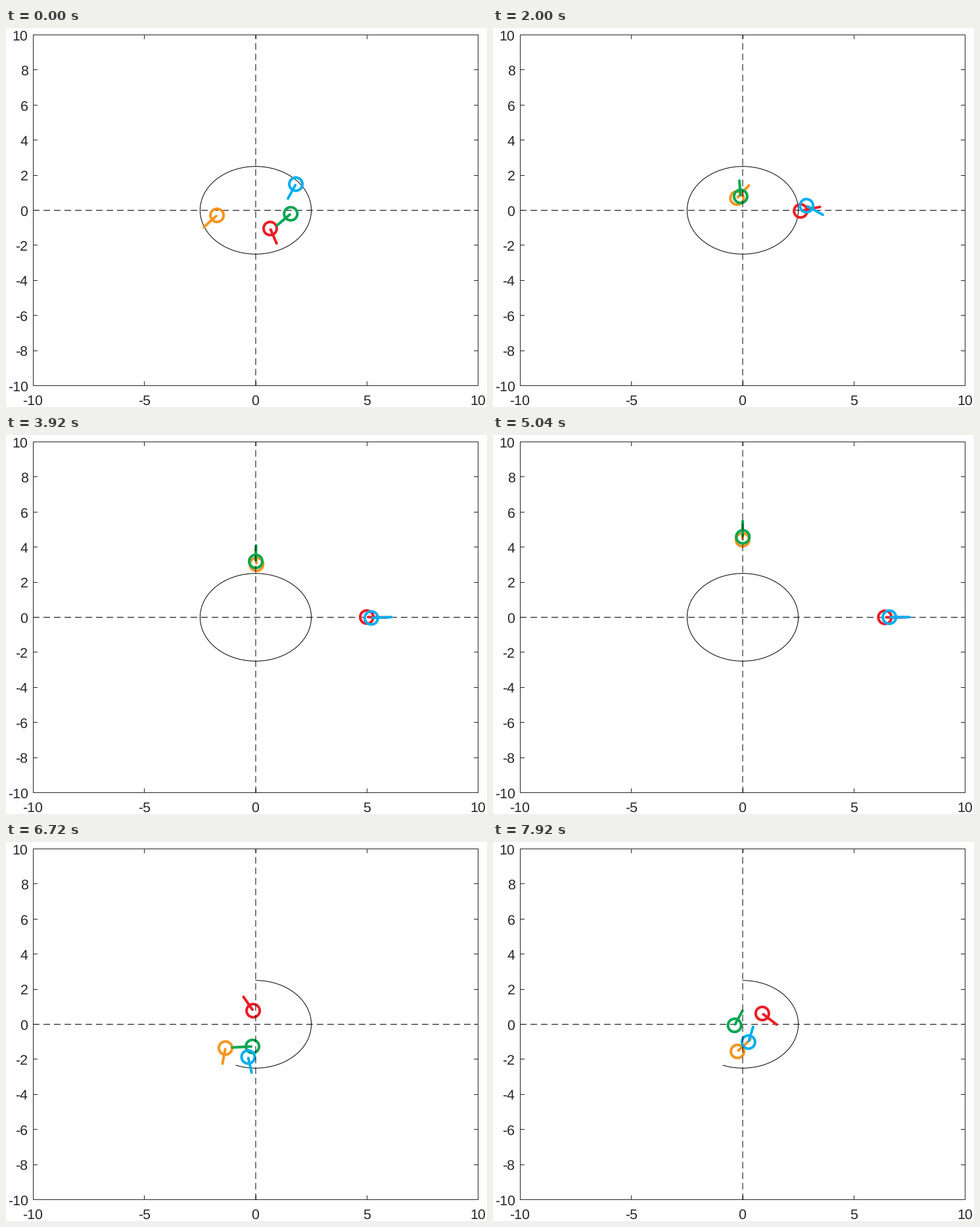
Animation of 732 by 577 pixels, one loop 8000 ms. Source, as a matplotlib script:

```python
import numpy as np
import matplotlib.pyplot as plt
from matplotlib.animation import FuncAnimation
from matplotlib.patches import Circle

WIDTH, HEIGHT, DPI = 732, 577, 96
PX = 72 / DPI  # points per pixel
LEFT, RIGHT, TOP, BOTTOM = 41.5, 718.5, 10.5, 544.5
FRAMES, INTERVAL = 100, 80
STEP, GAIN = 0.1, 2.0
STICK_START, STICK_END = 0.06, 0.9
RADIUS, STROKE = 10, 4
INK = "#262626"

plt.rcParams["font.family"] = "Liberation Sans"
plt.rcParams["text.hinting"] = "none"

# Robots in drawing order: colour and heading of the line each one follows
ROBOTS = [("#f7941e", np.pi / 2), ("#ed1c24", 0.0),
          ("#00a651", np.pi / 2), ("#00aeef", 0.0)]

# Each run: number of frames, last angle of the start zone, (x, y, heading) per robot
RUNS = [
    (81, -270.0, [(-1.74, -0.29, 3.99), (0.65, -1.04, -1.24),
                  (1.575, -0.2, 3.962), (1.805, 1.49, 4.306)]),
    (19, -110.7, [(-1.119, -1.3, -3.691), (0.055, 0.891, 4.815),
                  (-0.01, -1.034, 4.7875), (-0.157, -1.885, -4.454)]),
]


def to_px(x, y):
    return ((LEFT + RIGHT) / 2 + x * (RIGHT - LEFT) / 20,
            (TOP + BOTTOM) / 2 - y * (BOTTOM - TOP) / 20)


def crisp(value):
    """Centre of the pixel that holds a coordinate."""
    return np.floor(value) + 0.5


def follow_line(pose, goal):
    """One Euler step of a unicycle steering onto an axis through the origin."""
    x, y, heading = pose
    offset = y * np.cos(goal) - x * np.sin(goal)
    turn = GAIN * (goal - heading - offset)
    return (x + STEP * np.cos(heading), y + STEP * np.sin(heading),
            heading + STEP * turn)


def simulate():
    states = []
    for count, zone_end, poses in RUNS:
        for _ in range(count):
            states.append((zone_end, poses))
            poses = [follow_line(p, goal) for p, (_, goal) in zip(poses, ROBOTS)]
    return states


states = simulate()

fig = plt.figure(figsize=(WIDTH / DPI, HEIGHT / DPI), dpi=DPI, facecolor="white")
ax = fig.add_axes([0, 0, 1, 1])
ax.set_xlim(0, WIDTH)
ax.set_ylim(HEIGHT, 0)
ax.axis("off")


def line(xs, ys, color="black", width=1, **style):
    return ax.plot(xs, ys, color=color, lw=width * PX, snap=False, **style)[0]


def label(x, y, value, align):
    ax.text(x, y, str(value), size=16, color=INK, ha=align, va="baseline")


def draw_axes():
    frame = dict(color=INK, solid_capstyle="projecting", zorder=1)
    line([LEFT, RIGHT, RIGHT, LEFT, LEFT], [TOP, TOP, BOTTOM, BOTTOM, TOP], **frame)
    for value in range(-10, 11, 5):
        x = to_px(value, 0)[0]
        tick = crisp(x)
        line([tick, tick], [TOP, TOP + 6], **frame)
        line([tick, tick], [BOTTOM, BOTTOM - 6], **frame)
        label(x - 0.5, 574, value, "center")
    for value in range(-10, 11, 2):
        y = to_px(0, value)[1]
        tick = crisp(y)
        line([LEFT, LEFT + 6], [tick, tick], **frame)
        line([RIGHT, RIGHT - 6], [tick, tick], **frame)
        label(33.5, y + 8, value, "right")


draw_axes()
dashes = (0, (10, 6))
cx, cy = to_px(0, 0)
line([LEFT - 0.5, RIGHT], [cy, cy], ls=dashes, zorder=1)
line([cx, cx], [BOTTOM + 0.5, TOP], ls=dashes, zorder=4)
zone = line([], [], zorder=2)

bodies, sticks = [], []
for i, (color, _) in enumerate(ROBOTS):
    body = Circle((0, 0), RADIUS, fill=False, ec=color, lw=STROKE * PX,
                  zorder=3 + i / 10)
    bodies.append(ax.add_patch(body))
    sticks.append(line([], [], color, STROKE, solid_capstyle="round",
                       zorder=3.05 + i / 10))


def update(frame):
    zone_end, poses = states[frame]
    angle = np.radians(np.linspace(90, zone_end, 240))
    zone.set_data(*to_px(2.5 * np.cos(angle), 2.5 * np.sin(angle)))
    reach = np.array([STICK_START, STICK_END])
    for (x, y, heading), body, stick in zip(poses, bodies, sticks):
        body.center = to_px(x, y)
        stick.set_data(*to_px(x + reach * np.cos(heading),
                              y + reach * np.sin(heading)))
    return [zone, *bodies, *sticks]


anim = FuncAnimation(fig, update, frames=FRAMES, interval=INTERVAL,
                     repeat=True, repeat_delay=0, blit=False)
plt.show()
```
